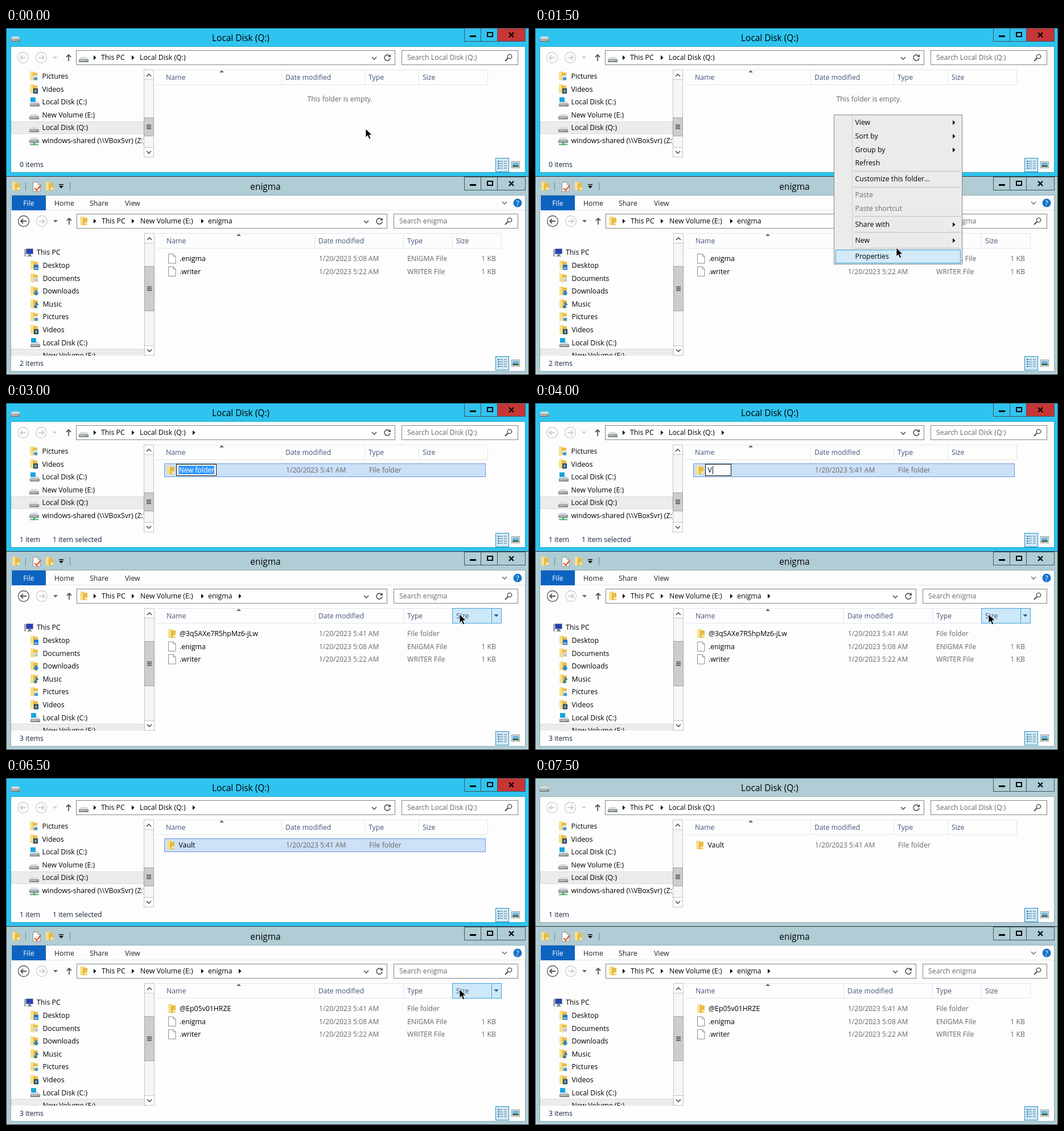
Animation, 919 px wide and 609 px high, one loop 8000 ms. Source, as an HTML page:

```html
<!DOCTYPE html>
<html lang="en">
<head>
<meta charset="utf-8">
<title>Two file windows</title>
<style>
html, body { margin: 0; width: 100%; height: 100%; overflow: hidden; }
svg { display: block; width: 919px; height: 609px; }
text { font-family: "Open Sans", "Noto Sans", sans-serif; white-space: pre; }
</style>
</head>
<body>
<svg id="stage" viewBox="0 0 919 609"></svg>
<script>
const STEP = 500, STEPS = 16;
const INK = '#000', GREY = '#686868', HEAD = '#43567a', STATUS = '#14233d', PAPER = '#fdfdfd', INACTIVE = '#b0ccd4';
const stage = document.getElementById('stage');

// drawing helpers; text is placed by its vertical centre
const rect = (x, y, w, h, fill, stroke) => stroke
  ? `<rect x="${x + .5}" y="${y + .5}" width="${w - 1}" height="${h - 1}" fill="${fill}" stroke="${stroke}"/>`
  : `<rect x="${x}" y="${y}" width="${w}" height="${h}" fill="${fill}"/>`;
const text = (x, y, str, fill = INK, size = 12.3, anchor = 'start') =>
  `<text x="${x}" y="${Math.round(y + size * .36)}" fill="${fill}" font-size="${size}" text-anchor="${anchor}">${str}</text>`;
const line = (d, stroke, width = 1) => `<path d="${d}" fill="none" stroke="${stroke}" stroke-width="${width}"/>`;
const shape = (d, fill) => `<path d="${d}" fill="${fill}"/>`;
const circle = (x, y, r, fill, stroke = 'none') =>
  `<circle cx="${x}" cy="${y}" r="${r}" fill="${fill}" stroke="${stroke}" stroke-width="1.3"/>`;
const at = (x, y, body) => `<g transform="translate(${x} ${y})">${body}</g>`;
const right = (x, y, fill = INK) => shape(`M${x - 2} ${y - 4}l4.5 4l-4.5 4z`, fill);
const down = (x, y, fill = INK) => shape(`M${x - 4} ${y - 2}h8l-4 4.5z`, fill);
const chevron = (x, y, dir, color, width = 1.7) => line(`M${x - 4} ${y - 2 * dir}l4 ${4 * dir}l4 ${-4 * dir}`, color, width);

// icons, centred on 0,0
const folder = shape('M-7 -8h7l1 2h5v13h-13z', '#f3d267') + shape('M-1 -6h7v13h-7z', '#e9bd45') +
  shape('M-7 -8h3l3 3v13l-3-1h-3z', '#f8e08a') + line('M-1 -5v12', '#cf9d2e') + shape('M1 2h5v4h-5z', '#f9e6a3');
const tag = (fill, body = '') => folder + rect(-1, -1, 8, 9, fill) + body;
const drive = shape('M-8 1l3-4h11l3 4z', '#d9dcde') + rect(-8, 1, 17, 5, '#7d8286') +
  rect(-7, 2, 15, 2, '#c3c7ca') + rect(4, 3, 3, 1, '#39b54a');
const page = shape('M-7 -9h9l4 4v13h-13z', '#fff') +
  line('M-6.500 -8.500h8.500l4 4v12.500h-12.500zM2 -8.500v4h4', '#8b8b8b');
const lines = color => line('M-4 -3h8M-4 0h8M-4 3h8M-4 6h8', color);
const icons = {
  folder, drive, page,
  pictures: tag('#e8f3f8', rect(0, 2, 6, 5, '#4595bb')),
  videos: tag('#33424f', rect(1, 1, 4, 5, '#5ba3cb')),
  desktop: tag('#2874c6', rect(0, 4, 6, 2, '#a9d5f5')),
  documents: tag('#f4f7f9', line('M0 1.500h6M0 4.500h6', '#5d7a92')),
  downloads: folder + shape('M1 -1h4v4h3l-5 5l-5-5h3z', '#1c83d6'),
  music: folder + line('M3 5v-8q1 4 4 4', '#1578c8', 2) + circle(2, 5, 2.5, '#1578c8'),
  system: at(1, 2, drive) + rect(-6, -8, 9, 8, '#16a5de'),
  network: at(0, -2, drive) + rect(-1, 4, 3, 4, '#38a85a') + rect(-7, 6, 15, 2, '#4cb36d'),
  pc: rect(-5, -7, 13, 10, '#2540b8', '#8b969e') + rect(-8, -6, 3, 13, '#a1abb2') + rect(-1, 3, 5, 3, '#7e8990') + rect(-3, 6, 9, 1, '#7e8990'),
  shortcut: rect(-8, -8, 16, 16, '#f6f6fa', '#a5a5ad') + line('M-4 5q0-7 6-7', '#31329b', 2.6) + shape('M-1 -5h6v6z', '#31329b'),
  bitmap: rect(-8, -7, 16, 14, '#f4efe8', '#a29d96') + rect(-6, 0, 12, 5, '#c9502f') + circle(2, -1, 3, '#e79b35'),
  contact: rect(-9, -5, 18, 12, '#e4f4fa', '#2b86ad') + rect(-6, -2, 5, 6, '#46a3c8') + line('M1 -.5h6M1 3.500h6', '#2b86ad'),
  rich: page + lines('#7d96a8') + rect(-4, -4, 4, 4, '#4a83ae'),
  plain: page + lines('#aab8c2'),
  zip: folder + line('M0 -7v14', '#6e5b2c', 2.5)
};
const icon = (name, x, y) => at(x, y, icons[name]);

const frame = (y, h, fill, edge) => rect(0, y, 919, h, fill, edge);
const client = (y, h, edge) => rect(8, y - 1, 905, h + 2, PAPER, edge);

function titleButtons(y, closeFill) {
  return rect(805, y, 108, 24, 'none', '#3c565f') + rect(864, y + 1, 48, 22, closeFill) +
    line(`M834.500 ${y}v24M863.500 ${y}v24`, '#3c565f') +
    rect(815, y + 13, 11, 3, '#000') +
    `<rect x="846" y="${y + 8}" width="9" height="7" fill="none" stroke="#000" stroke-width="2"/>` +
    line(`M884 ${y + 8}l8 8m0 -8l-8 8`, '#000', 2.2);
}

function navBar(x, y, boxEnd, canGoBack, place, crumbs, search) {
  const strong = '#555', weak = '#cfcfcf', back = canGoBack ? strong : weak;
  const arrow = (cx, dir, c) => circle(cx, y, 9.5, 'none', c) + line(`M${cx - 5 * dir} ${y}h${10 * dir}m${-4 * dir} -4l${4 * dir} 4l${-4 * dir} 4`, c, 1.8);
  const marks = crumbs.filter(c => typeof c === 'number').map(c => right(c, y)).join('');
  const names = crumbs.filter(Array.isArray).map(([cx, s]) => text(cx, y, s)).join('');
  return arrow(x + 30, -1, back) + arrow(x + 62, 1, weak) + down(x + 86, y, canGoBack ? '#666' : weak) +
    line(`M${x + 110} ${y + 6}v-11m-4 4l4-4l4 4`, '#555', 1.8) +
    rect(x + 123, y - 13, boxEnd - x - 122, 26, '#fff', '#858585') + icon(place, x + 136, y + (place === 'drive' ? 2 : 0)) +
    marks + names + chevron(boxEnd - 36, y + 1, 1, '#555') +
    line(`M${boxEnd - 9} ${y - 3}a5 5 0 1 0 1 4`, '#555', 1.6) + shape(`M${boxEnd - 7} ${y - 6}v5h-5z`, '#555') +
    rect(boxEnd + 12, y - 13, 899 - boxEnd - 11, 26, '#fff', '#858585') +
    text(boxEnd + 22, y, search, GREY) +
    circle(885, y - 2, 3.7, 'none', '#444') + line(`M882 ${y + 1}l-5 5`, '#444', 2);
}

function scrollBar(x, y, h, thumbY, thumbH) {
  const mid = thumbY + thumbH / 2;
  return rect(x, y, 18, h, '#f6f6f6', '#c4c4c4') + rect(x, y, 18, 18, PAPER, '#c4c4c4') +
    rect(x, y + h - 18, 18, 18, PAPER, '#c4c4c4') + rect(x, thumbY, 18, thumbH, '#cdcdcd', '#a3a3a3') +
    chevron(x + 9, y + 10, -1, '#555') + chevron(x + 9, y + h - 9, 1, '#555') +
    line(`M${x + 5} ${mid - 3}h8m-8 3h8m-8 3h8`, '#444', 1.3);
}

function header(y, edges, sortX) {
  const [left, ...ends] = edges;
  return line(`M${left} ${y + .5}H${ends[3]}M${left} ${y + 26.5}H${ends[3]}` +
      ends.map(e => `M${e + .5} ${y}v26`).join(''), '#e1e5e9') +
    shape(`M${sortX - 4} ${y + 5}l4-4l4 4z`, '#50698a') +
    ['Name', 'Date modified', 'Type', 'Size'].map((s, i) =>
      text(i ? ends[i - 1] + 7 : left + 18, y + 14, s, HEAD, i === 1 ? 12.1 : 12.3)).join('');
}

const viewButtons = y => rect(860, y - 12, 24, 25, '#cfe9f7', '#2d8fc0') +
  [-6, -2, 2, 6].map(d => rect(864, y + d - 1, 3, 2, '#487a98') + line(`M868 ${y + d}h5m2 0h5`, '#55798f')).join('') +
  rect(888, y - 6, 15, 12, '#fff', '#8a8a8a') + rect(890, y - 4, 11, 8, '#6db6dd') + rect(890, y + 1, 11, 3, '#3f6a4e');

const tree = (items, x, y) => items.map(([name, label], i) => {
  const cy = y + i * 22.6, dy = name === 'drive' ? 2 : 0;
  return icon(name, x, cy + dy) + text(x + 14.5, cy, label);
}).join('');

const fileRow = (name, label, y, time, type, size = '') =>
  icon(name, 292, y) + text(305, y, label) + text(550, y, '1/20/2023 ' + time, GREY, 12) +
  text(705, y, type, GREY) + text(861, y, size, GREY, 12.3, 'end');

function topWindow(s) {
  let out = frame(0, 261, s.active ? '#2fc4ef' : INACTIVE, s.active ? '#14516a' : '#3c4a50') +
    client(33, 220, s.active ? '#25a2c7' : '#93adb5') + icon('drive', 16, 18) +
    text(412.5, 17, 'Local Disk (Q:)', INK, 15.4, 'middle') +
    titleButtons(0, s.active ? '#c73636' : 'none') +
    navBar(0, 52, 683, false, 'drive',
      [156, [167, 'This PC'], 223, [235, 'Local Disk (Q:)'], ...(s.made && s.active ? [330] : [])], 'Search Local Disk (Q:)') +
    rect(9, 164, 233, 22, '#ececec', '#dadada') +
    `<g clip-path="url(#topTree)">` + tree([['pictures', 'Pictures'], ['videos', 'Videos'], ['system', 'Local Disk (C:)'],
      ['drive', 'New Volume (E:)'], ['drive', 'Local Disk (Q:)'], ['network', 'windows-shared (\\\\VBoxSvr) (Z:)']], 49, 84.5) + '</g>' +
    scrollBar(242, 73, 154, 157, 33) + header(73, [263, 484, 630, 725, 846], 379) +
    text(24, 240, s.made ? '1 item' : '0 items', STATUS) +
    (s.selected ? text(82, 240, '1 item selected', STATUS) : '') + viewButtons(240);
  if (!s.made) return out + text(586.5, 124.5, 'This folder is empty.', GREY, 12.2, 'middle');
  if (s.selected || s.focused) out += rect(278, 106, 565, 24, s.selected ? '#cce0f7' : PAPER, '#6f98d4');
  out += icon('folder', 290, 118) + text(492, 118, '1/20/2023 5:41 AM', GREY, 12) + text(638, 118, 'File folder', GREY);
  if (s.edit === null) return out + text(303.500, 118, 'Vault');
  const fresh = s.edit === 'New folder';
  out += rect(299, 107, fresh ? 71 : s.edit.length > 3 ? 56 : 46, 21, '#fff', '#111');
  if (fresh) out += rect(303, 110, 63, 15, '#3399ff');
  out += text(303.5, 118, s.edit, fresh ? '#fff' : INK);
  const caret = { V: 312, Vau: 326, Vault: 334 }[s.edit];
  return out + (caret ? rect(caret, 111, 1, 14, '#111') : '');
}

function bottomWindow(s) {
  const top = s.made ? 427.5 : 405;
  return frame(260, 349, INACTIVE, '#2b3236') + client(294, 308, '#93adb5') +
    icon('folder', 18, 278) + line('M34.500 271v14M112.500 271v14', '#71868e') +
    icon('page', 54, 279) + line('M50 281l4 4l7-9', '#e05a2b', 2.2) + icon('folder', 77, 278) +
    rect(93, 274, 8, 1.5, '#111') + down(97, 279) +
    text(456, 278, 'enigma', INK, 15.4, 'middle') + titleButtons(261, 'none') +
    rect(10, 294, 60, 26, '#0c63c0') + text(40, 307.5, 'File', '#fff', 12.3, 'middle') +
    text(85, 308, 'Home', '#222') + text(147, 308, 'Share', '#222') + text(209, 308, 'View', '#222') +
    rect(70, 319, 842, 1, '#e3e6e8') + chevron(876, 307, 1, '#777') +
    circle(899, 307, 7.5, '#1574ca') + text(899, 307, '?', '#fff', 12.5, 'middle') +
    navBar(1, 339, 669, true, 'folder',
      [156, [168, 'This PC'], 223, [236, 'New Volume (E:)'], 345, [355, 'enigma'], ...(s.made ? [411] : [])], 'Search enigma') +
    `<g clip-path="url(#lowTree)">` + rect(9, 563, 234, 23, '#ececec', '#dadada') +
    icon('pc', 40, 394) + text(54, 394, 'This PC') +
    tree([['desktop', 'Desktop'], ['documents', 'Documents'], ['downloads', 'Downloads'], ['music', 'Music'], ['pictures', 'Pictures'],
      ['videos', 'Videos'], ['system', 'Local Disk (C:)'], ['drive', 'New Volume (E:)']], 50, 416.5) + '</g>' +
    scrollBar(243, 360, 215, 418, 79) +
    (s.selected ? rect(784, 360, 87, 27, '#cde8f8') : '') + header(360, [264, 542, 698, 784, 870], 409) +
    (s.selected ? rect(784, 360, 87, 27, 'none', '#45a3d9') + line('M853.500 361v25', '#45a3d9') + down(861.500, 373, '#33587a') : '') +
    (s.made ? fileRow('folder', s.cipher, 405, '5:41 AM', 'File folder') : '') +
    fileRow('page', '.enigma', top, '5:08 AM', 'ENIGMA File', '1 KB') +
    fileRow('page', '.writer', top + 22.5, '5:22 AM', 'WRITER File', '1 KB') +
    text(24, 588.5, s.made ? '3 items' : '2 items', STATUS) + viewButtons(588);
}

const panel = (x, y, w, h, gutter) => rect(x, y, w, h, '#ebebec', '#858585') +
  line(`M${gutter}.5 ${y + 2}v${h - 4}`, '#cfcfcf');
const highlight = (x, y, w) => rect(x, y - 12, w, 24, '#d3eaf8', '#2a9fd8');
const rule = (x1, x2, y) => line(`M${x1} ${y + .5}H${x2}`, '#bdbdbd');

function menu(s) {
  const entries = [['View', 166, 1], ['Sort by', 190, 1], ['Group by', 214, 1], ['Refresh', 237], ['Customize this folder...', 265],
    ['Paste', 293], ['Paste shortcut', 317], ['Share with', 345, 1], ['New', 373, 1], ['Properties', 400.5]];
  return panel(525, 152, 226, 263, 557) + [251, 279, 330, 358, 386].map(y => rule(560, 748, y)).join('') +
    entries.map(([label, y, more]) => (label === s.hot ? highlight(528, Math.round(y), 220) : '') +
      text(562.5, y, label, label.startsWith('Paste') ? '#6f6f6f' : INK) + (more ? right(736, y) : '')).join('');
}

function submenu(s) {
  const entries = [['folder', 'Folder', 373], ['shortcut', 'Shortcut', 396.5], ['bitmap', 'Bitmap image', 424.5], ['contact', 'Contact', 448],
    ['rich', 'Rich Text Document', 471.5], ['plain', 'Text Document', 495], ['zip', 'Compressed (zipped) Folder', 518.5]];
  return panel(746, 358, 200, 175, 777) + rule(780, 919, 410) + (s.hotFolder ? highlight(748, 373, 190) : '') +
    entries.map(([name, label, y]) => icon(name, 760, y) + text(783, y, label)).join('');
}

const cursor = ([x, y]) => at(x, y,
  '<path d="M0 0v15l3.500-3.300l2.600 6l2.700-1.200l-2.600-5.700h5z" fill="#000" stroke="#fff" stroke-width=".8"/>');

function stateAt(step) {
  const between = (a, b) => step >= a && step <= b;
  return {
    made: step >= 6, active: step < 15, selected: between(6, 13), focused: step === 14,
    menu: between(2, 5), submenu: between(4, 5), hotFolder: step === 5,
    hot: step === 3 ? 'Properties' : between(4, 5) ? 'New' : '',
    edit: between(6, 7) ? 'New folder' : { 8: 'V', 9: 'Vau', 10: 'Vault' }[step] ?? null,
    cipher: step < 11 ? '@3qSAXe7R5hpMz6-jLw' : '@Ep05v01HRZE',
    pointer: step > 13 ? null : step > 4 ? [797, 371] : [[632, 177], [526, 152], [526, 152], [635, 386], [690, 372]][step]
  };
}

const defs = '<defs><clipPath id="topTree"><path d="M9 73H242V227H9z"/></clipPath>' +
  '<clipPath id="lowTree"><path d="M9 360H243V575H9z"/></clipPath></defs>';
let shown = -1;

function render(now) {
  const step = Math.floor(now / STEP) % STEPS;
  if (step !== shown) {
    shown = step;
    const s = stateAt(step);
    stage.innerHTML = defs + topWindow(s) + bottomWindow(s) + (s.menu ? menu(s) : '') +
      (s.submenu ? submenu(s) : '') + (s.pointer ? cursor(s.pointer) : '');
  }
}

const start = performance.now();
function tick() {
  render(performance.now() - start);
  requestAnimationFrame(tick);
}
tick();
</script>
</body>
</html>
```
